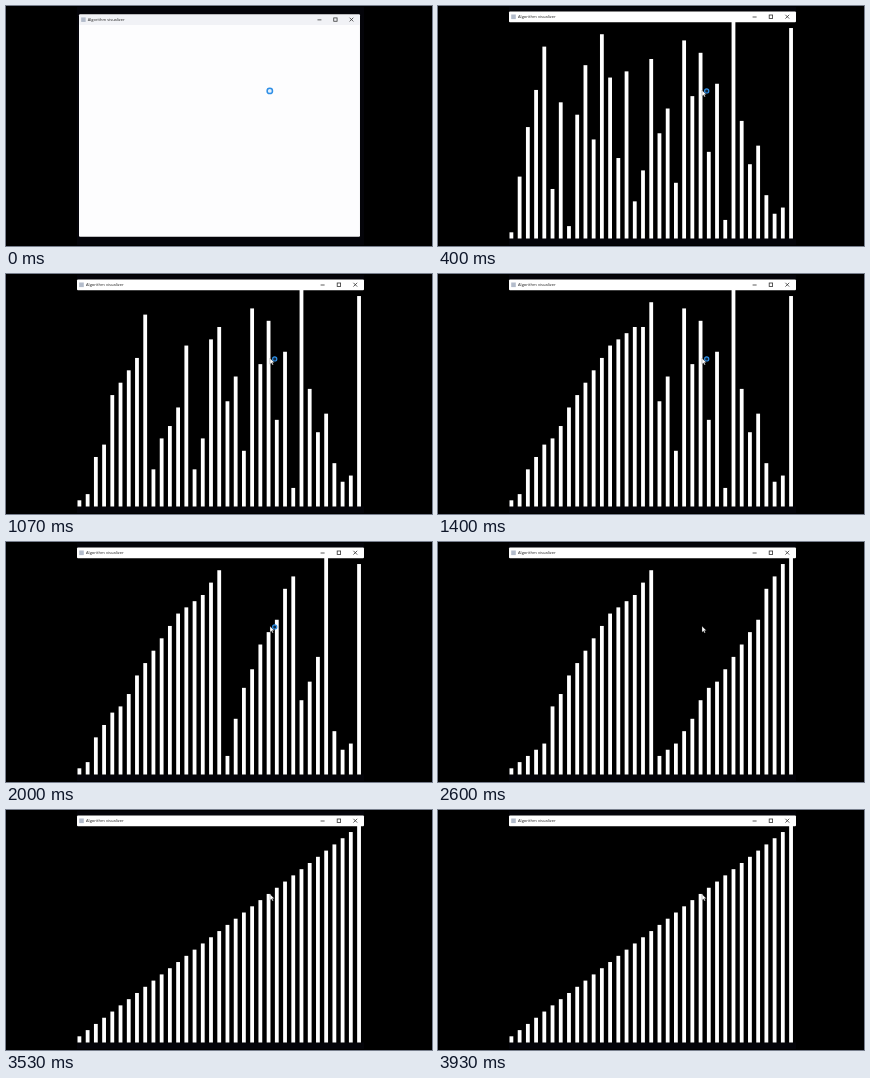
Write an HTML page that moves like this. It is 426 by 240 pixels and loops after 3990 ms.

```html
<!DOCTYPE html>
<html lang="en">
<head>
<meta charset="utf-8">
<title>Algorithm visualizer</title>
<style>
  html, body { margin: 0; width: 100%; height: 100%; overflow: hidden; background: #000; }
  svg { display: block; width: 100%; height: 100%; }
  text { font: 4.1px "Open Sans", "Noto Sans", sans-serif; fill: #222; }
</style>
</head>
<body>
<svg viewBox="0 0 426 240">
  <rect width="426" height="240" fill="#000"/>
  <rect x="71" y="1" width="287" height="238" fill="#040409"/>
  <g id="win">
    <rect id="content" x="71" y="5.5" width="287" height="227" rx="1"/>
    <rect id="titlebar" x="71" y="5.5" width="287" height="10.7" rx="1"/>
    <rect x="73.2" y="8.5" width="4.6" height="4.6" fill="#b3bccb"/>
    <text x="80" y="12.3">Algorithm visualizer</text>
    <g fill="none" stroke="#333" stroke-width=".8">
      <path d="M314.6 11h4M347.4 8.8l3.8 3.8m0-3.8l-3.8 3.8"/>
      <rect x="331.2" y="9" width="3.4" height="3.4"/>
    </g>
    <g id="bars" fill="#fff"></g>
  </g>
  <circle id="ring" fill="#e4f2ff" stroke="#2f8fe6"/>
  <path id="arrow" d="M264 84.2v6l1.4-1.2 1 2 1-.5-1-1.9h1.9z" fill="#fff" stroke="#222" stroke-width=".3"/>
</svg>
<script>
const LOOP = 3990, FRAME = 200 / 3;
const OPENED = 2, BUSY_UNTIL = 35;
const BASE = 232.5, UNIT = 6.19, PITCH = 8.225;

const initial = [
  10, 24, 1, 31, 18, 8, 22, 2, 20,
  28, 16, 33, 26, 13, 27, 6, 11, 29,
  17, 21, 9, 32, 23, 30, 14, 25, 3,
  35, 19, 12, 15, 7, 4, 5, 34
];

// Frame index and number of array writes finished by then.
const pace = [[2.5, 0], [12, 38], [21, 74], [30, 113], [39, 151], [46, 181]];

const $ = id => document.getElementById(id);
const setAttrs = (el, attrs) => {
  for (const key in attrs) el.setAttribute(key, attrs[key]);
};

function mergeWrites(source) {
  const a = source.slice(), writes = [];
  (function sort(lo, hi) {
    if (lo >= hi) return;
    const mid = (lo + hi) >> 1;
    sort(lo, mid);
    sort(mid + 1, hi);
    const left = a.slice(lo, mid + 1), right = a.slice(mid + 1, hi + 1);
    for (let i = lo; i <= hi; i++) {
      const takeLeft = !right.length || left[0] <= right[0];
      a[i] = (takeLeft ? left : right).shift();
      writes.push([i, a[i]]);
    }
  })(0, a.length - 1);
  return writes;
}

const writes = mergeWrites(initial);

const bars = initial.map((_, i) => {
  const bar = document.createElementNS("http://www.w3.org/2000/svg", "rect");
  setAttrs(bar, { x: 71.5 + i * PITCH, width: 3.8 });
  return $("bars").appendChild(bar);
});

function writesDone(frame) {
  if (frame <= pace[0][0]) return 0;
  for (let i = 1; i < pace.length; i++) {
    const [f0, n0] = pace[i - 1], [f1, n1] = pace[i];
    if (frame <= f1) return Math.floor(n0 + (n1 - n0) * (frame - f0) / (f1 - f0) + 1e-6);
  }
  return writes.length;
}

// Frame starts fall on whole hundredths of a second.
function frameAt(t) {
  const next = Math.ceil(t / FRAME);
  return Math.round(next * FRAME / 10) * 10 > t ? next - 1 : next;
}

function draw(t) {
  const frame = frameAt(t), open = frame >= OPENED;
  const values = initial.slice();
  writes.slice(0, writesDone(frame)).forEach(([i, v]) => { values[i] = v; });
  bars.forEach((bar, i) => {
    const height = values[i] * UNIT;
    setAttrs(bar, { y: BASE - height, height });
  });

  const growing = frame === 0;
  $("win").setAttribute("transform", growing ? "translate(3.5 3.1) scale(.979)" : "");
  $("content").setAttribute("fill", open ? "#000" : "#fdfdfe");
  $("titlebar").setAttribute("fill", growing ? "#f1f2f6" : "#fff");
  $("bars").setAttribute("visibility", open ? "visible" : "hidden");
  $("arrow").setAttribute("visibility", open ? "visible" : "hidden");
  setAttrs($("ring"), {
    cx: open ? 268.7 : 263.8,
    cy: 84.9,
    r: open ? 2.1 : 2.7,
    fill: open ? "#10283f" : "#e4f2ff",
    "stroke-width": open ? 1.2 : 1.5,
    visibility: frame < BUSY_UNTIL ? "visible" : "hidden"
  });
}

const start = performance.now();
function tick() {
  draw((performance.now() - start) % LOOP);
  requestAnimationFrame(tick);
}
draw(0);
requestAnimationFrame(tick);
</script>
</body>
</html>
```
